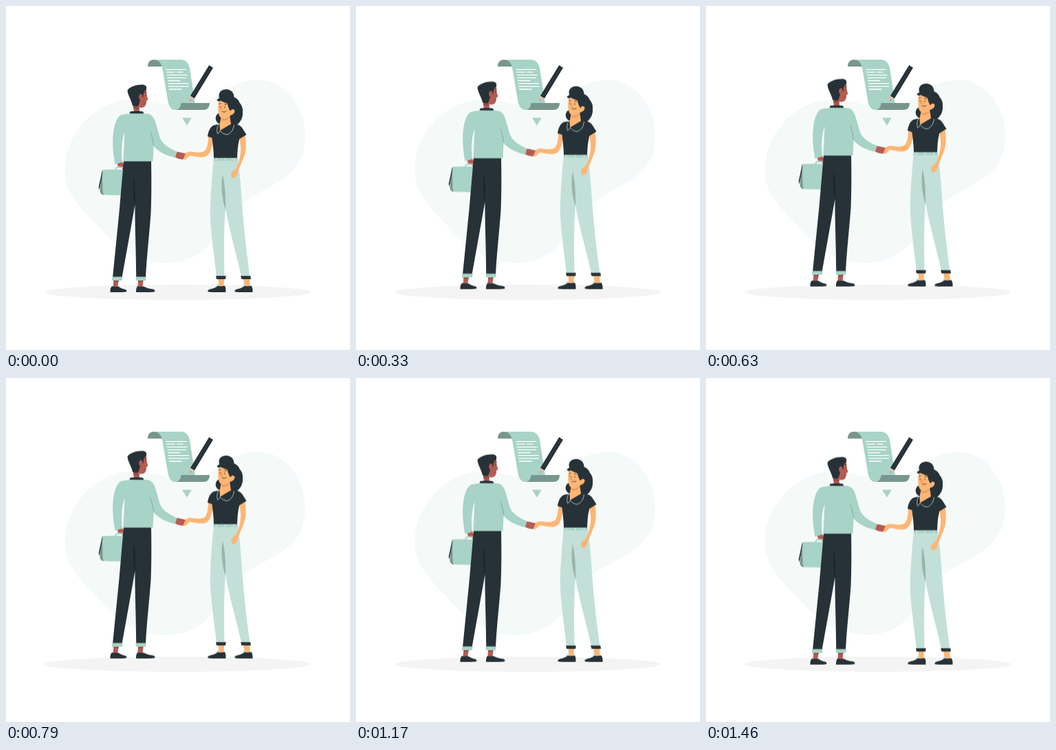
These frames come from a looping animation (500 by 500 pixels, 1500 ms). An HTML page:

```html
<!DOCTYPE html>
<html lang="en">
<head>
<meta charset="utf-8">
<title>Handshake</title>
<style>
  html, body { margin: 0; width: 100%; height: 100%; overflow: hidden; background: #fff; }
  svg { display: block; width: 100vw; height: 100vh; }
  .mint { fill: #a8d3c7; }
  .pale { fill: #c3e0d8; }
  .moss { fill: #78968d; }
  .ink { fill: #263238; }
  .deep { fill: #1a2328; }
  .brown { fill: #b55b52; }
  .peach { fill: #ffb573; }
  .line { fill: none; stroke-linecap: round; stroke-linejoin: round; }
</style>
</head>
<body>
<svg viewBox="0 0 500 500" xmlns="http://www.w3.org/2000/svg">
  <path fill="#f5faf8" stroke="#ebf4f1" stroke-width=".5" d="M86 238C86 190 128 137 182 137C215 137 232 147 262 148C302 149 318 108 366 108C406 108 434 146 434 189C434 232 410 248 378 265C340 285 328 297 306 332C290 357 265 373 235 373C190 373 161 351 132.500 318C107 291 86 272 86 238Z"/>
  <ellipse cx="249.5" cy="416" rx="193.5" ry="11" fill="#f4f4f4"/>

  <!-- contract and pencil -->
  <path class="mint" d="M215 78H254C261 78 265 82 267 90L275 142H255C254 148 251 151 246 151C239 151 236 144 235 136L228 95C226 83 222 78 215 78Z"/>
  <path class="moss" d="M206 88C206 82 209 78 215 78C221 78 225 82 226.600 88Z"/>
  <path class="moss" d="M254.500 141H296C296 148 292 151 287 151H246C251 151 254 147 254.500 141Z"/>
  <g id="text" class="line" stroke="#fff" stroke-width="1.3"></g>
  <path fill="#f3b5a6" d="M268 130.500L273.800 134.200L267.500 137.500Z"/>
  <path class="ink" d="M268 136L269 136.500L267.400 137.700ZM295.200 86L301 89.700L274 134.200L268 130.500Z"/>
  <path class="line" stroke="#3f4a50" stroke-width=".5" d="M297.500 89L271.500 131"/>
  <path class="mint" d="M256 162.500H269.700L263 173.700Z"/>

  <g id="pair">
    <!-- briefcase -->
    <path class="ink" d="M140 238L134.700 263L135.500 267L140 248Z"/>
    <path class="moss" d="M140.500 238.500L136.500 266Q136 274 142 274.500L146 238Z"/>
    <path class="mint" d="M143 238Q156 236.800 171 238V275L145 274.500Q141 274.500 140.600 270Q139.800 250 140.500 241Q141 238.200 143 238Z"/>
    <path class="brown" d="M161.500 228L169 226.500C171 229 172.500 232 171.500 235L170 238L167 234L163 233.500Z"/>
    <path class="line" stroke="#a8d3c7" stroke-width="1.8" d="M159 238Q159.500 234.500 163 234.500H171"/>

    <!-- man -->
    <path class="brown" d="M156.500 398H164L162 409H155.500ZM192 398H199.500L198.500 409H191.500Z"/>
    <path fill="#8c4640" d="M156.500 398.500H164L163.600 400.500H156.300ZM192 398.500H199.500L199.300 400.500H192Z"/>
    <path class="ink" d="M151.500 416V414C151.500 411 152.500 408.500 154 407.200Q159 408.200 163 407.500C166 410 170 411 173 411.800C175.500 412.600 176 414.500 175 415.300Q172 416 168 416Z"/>
    <path class="ink" d="M189 416V414C189 411 190 408.500 191 407.200Q196 408.200 200 407.500C204 410 209 410.700 213.500 411.500C216.500 412.200 217 414 216 415.200Q213 416 208 416Z"/>
    <path class="ink" d="M171 225H211C211.500 250 211.500 280 210.500 302C208 335 204.500 365 203 395H189.300C189 350 187.300 320 187.500 289L168.500 395H155L164.500 300Z"/>
    <path class="deep" d="M186.300 248C184.300 262 185 278 187.500 290C187.800 275 187.500 262 186.300 248Z"/>
    <path class="mint" d="M154.500 393.500H169.700L168.800 399H153.700ZM188.500 393.500H204L203 399H189Z"/>
    <path class="brown" d="M184 138L186 154H194L193.500 147.300C198 148.300 202 147 203 144L204 138L206.500 136L204.500 130L204 121L190 121Z"/>
    <path fill="#934840" d="M185 146L193.500 147.500V149.500Q189 150 185.300 148.500Z"/>
    <path class="ink" d="M176.500 123C178 117.500 190 114 199 114.300C205 114.700 205.500 120.500 202.500 122.800C200 124.500 200 128 199.300 133.300C198.300 132.500 198.300 130 197.500 128C195 126.500 192 130 193.500 134.500L195.200 137C193.500 140 193.500 143.500 191.500 145.800Q187 146.300 184 144.800C182.500 137 177.500 131 176.500 123Z"/>
    <path class="line" stroke="#263238" stroke-width=".9" d="M202 125.300L204 125.600M203.300 129V130.500"/>
    <path class="line" stroke="#7c352f" stroke-width=".7" d="M201 141.200L204 140.700"/>
    <path class="mint" d="M166 159C170 156 200 155.300 208 157C214 159 217 166 219 175L223 189C226 200 236 206 249.500 212L246 220.500C232 217 221 211.500 214.500 203.500L213.500 225.700H170.500L172.500 183C168 195 167 212 169 227L158.500 230C156 217 154.500 202 155.500 189C156.500 176 160 163 166 159Z"/>
    <path class="line" stroke="#7c9f95" stroke-width=".8" d="M210 183Q213 190 214.500 202"/>
    <path class="ink" d="M180.500 153.300Q190 151.800 198.800 153.300L200.500 156.300H179.500Z"/>
    <path class="brown" d="M248.500 212C253 212 257 213.500 261.500 214.500C261 218 259 222 257 223C252 222.500 249 221.500 246 220Z"/>

    <!-- woman -->
    <path class="peach" d="M308.500 396H317L316.500 409H309.500ZM345 396H354L355 409H347Z"/>
    <path class="pale" d="M303.500 407.500L309 403.500L310.500 408ZM343 407.500L346.500 403.500L348.500 408Z"/>
    <path class="ink" d="M293.500 415.300C292.500 413 295 411.800 298 411.200C302 410.300 305 409 308 406.800Q313 408 318 406.500C319.500 409 319.800 412 319.300 416H300Q296 416 293.500 415.300Z"/>
    <path class="ink" d="M332.700 415.300C331.700 413 334 411.800 337 411.200C341 410.300 344 409 347 406.800Q352 408 356.500 406.500C358.300 409 358.800 412 358.500 416H339Q335 416 332.700 415.300Z"/>
    <path class="pale" d="M302 221H336.500C340 240 342 270 344 300C347 335 350.500 365 354.500 393H342C335 360 324 325 319 293C316.500 320 317 360 317.500 393H306C301 350 295.500 315 297 290C298 265 300 240 302 221Z"/>
    <path fill="#9bb4ac" d="M315 245C312 260 313.500 280 319 296C319.500 276 318.500 262 315 245Z"/>
    <path class="mint" d="M302 220.500H336.500L337.200 225H301.500Z"/>
    <path class="line" stroke="#d4ebe4" stroke-width="1.1" d="M306 221V224.500M318.500 221V224.500M331.500 221V224.500"/>
    <path class="ink" d="M305 392.300H319.800L319 397H306ZM341 392.300H355.300L356 397H342.500Z"/>

    <path class="peach" d="M294 189L300.500 191C300.500 205 297 217 289 219.300C281 221 274 218 267 217.500L260.500 223.500C258 223.500 257.500 221 259 219L261 214C265 211 268 211 272 212C280 213.500 286 213 290 209.500C293 204 294 197 294 189Z"/>
    <path class="peach" d="M339.500 191L347.500 188C349.500 200 349 211 345.700 220L336.500 242C336 247 333 251 328 249.500C327 246.500 326.500 244 328 241.500L335 235.500C339 226 342 213 341 204Z"/>
    <path class="ink" d="M303 173C311 171.300 322 170.500 331 172C337 171 342 174.500 344.500 179L349.500 187L339.300 193.300C336.500 203 336.500 212 336 220.700H302C302 211 300.500 202 299.500 191.500L293 189.500C294 182 297 174.500 303 173Z"/>

    <path class="ink" d="M309.500 131.500C309 124.500 314 121 320 121C327 121 331.500 126 331.500 132.500C336 134 338.500 137.500 339.500 140.500C343 144 344.500 149 344 154C344.500 161 342 166 339 169.500C335.500 174 329.500 174.500 326 171H309.500C305.500 168.500 303.500 164 305.500 159.500C306.500 157 309 155.500 311.500 155L312 138Z"/>
    <path class="peach" d="M313 160L310.500 171.500L311 181L327 171.500L325 158Z"/>
    <path fill="#e99a5c" d="M313.500 163.500Q319 165 324.500 161L324.700 163Q319 168 313 166Z"/>
    <path class="peach" d="M309.500 138C307.500 145 307.500 157 311.500 161.500C315 165.500 322 163.500 326 159C331 158 333.500 154 332 151C330 149 327 150 325.500 152L324.500 141L317 136Z"/>
    <path class="ink" d="M306.500 136.500C310 131.500 320 131.500 328 135C333 140 332 148 328.500 150L326 152.500C324 149 322.500 146 322 142C318 140.500 314 138.500 312 137.500C310 139 308 139 306.500 136.500Z"/>
    <g class="line" stroke="#263238" stroke-width=".9">
      <path d="M309.800 142.300L312 141.600M317.800 142.500L320.300 143.300M311.200 145.800V147M318 146.300V147.600"/>
      <path stroke="#d98544" stroke-width=".8" d="M313.700 146L312.200 150.500L314.200 150.800"/>
      <path stroke-width=".8" d="M314 153.300Q316.500 155.500 320 153.300"/>
    </g>
    <path class="line" stroke="#c3e0d8" stroke-width=".8" d="M309 172C306.500 176 306 182 307.700 185.500Q310 184.500 311 181Q315 186.500 321 187C326.500 185.500 331 180 331.300 173"/>
  </g>
</svg>
<script>
  // x start, x end, y of each written stroke
  const lines = [
    [233, 261.5, 92.4], [233.5, 245, 96.2], [248.5, 257, 96.2], [234.5, 263, 100.3],
    [235, 261.5, 104.4], [235.5, 253, 108.5], [236, 265.5, 112.6], [236.5, 265.5, 116.8], [237.5, 255, 121]
  ];
  document.getElementById('text').innerHTML =
    lines.map(([a, b, y]) => `<path d="M${a} ${y}H${b}"/>`).join('');

  // Linear float up and down, drawn at 24 steps per second
  const loop = 1500, half = 18, step = loop / (2 * half);
  const low = { transform: 'translateY(0.56px)', easing: `steps(${half})` };
  const high = { transform: 'translateY(-9.44px)', easing: `steps(${half})` };
  document.getElementById('pair').animate([low, high, low], {
    duration: loop, iterations: Infinity, delay: -step - 4
  });
</script>
</body>
</html>
```
